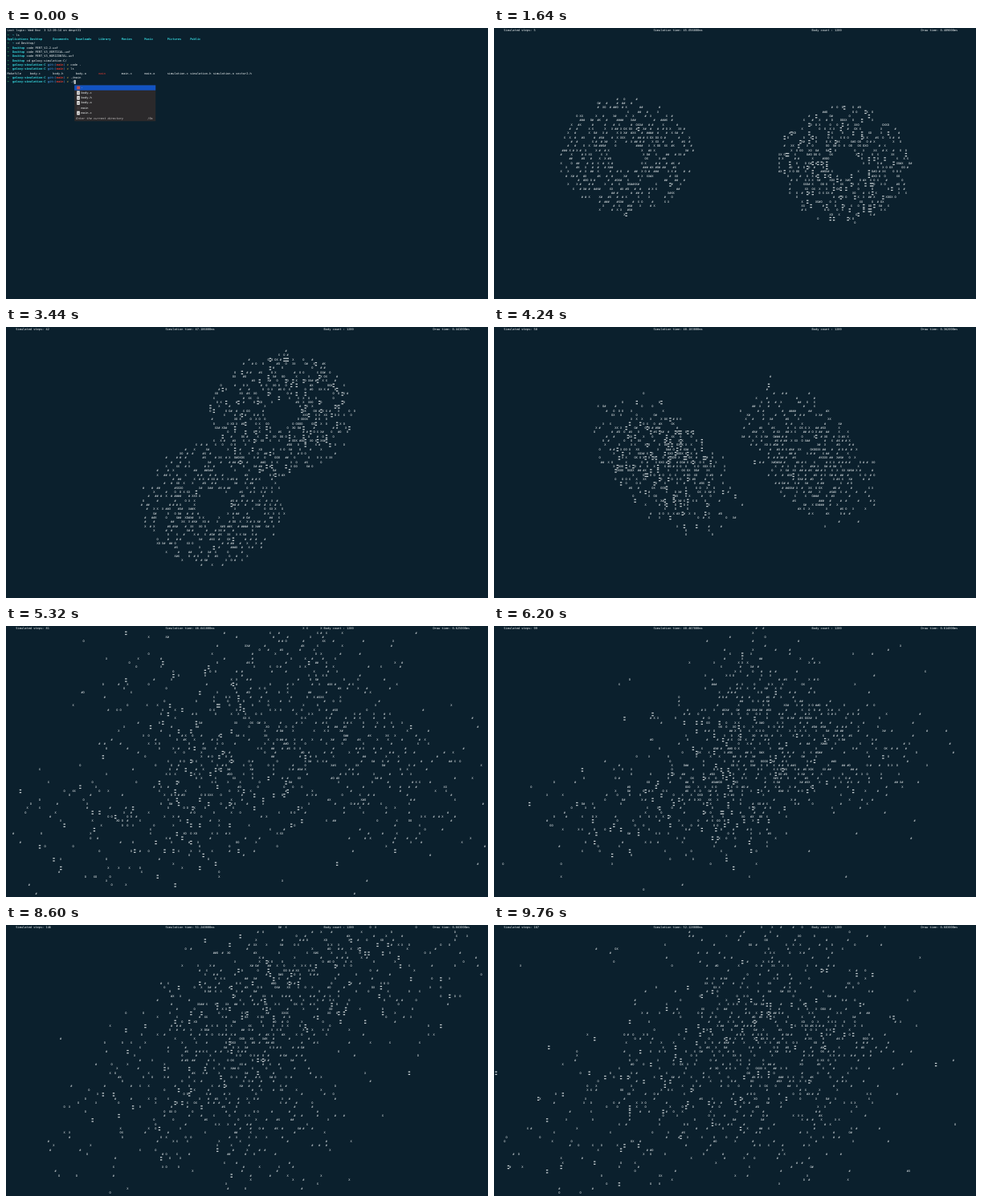
An HTML page with a canvas for the animation above (9.8 s loop, 600 by 338 pixels).

```html
<!DOCTYPE html>
<html lang="en">
<head>
<meta charset="utf-8">
<title>Galaxy simulation in a terminal</title>
<style>
html, body { margin: 0; width: 100%; height: 100%; overflow: hidden; background: #0b202d; }
canvas { display: block; }
</style>
</head>
<body>
<canvas id="stage" width="600" height="338"></canvas>
<script>
const ctx = document.getElementById('stage').getContext('2d');
const LOOP = 9.8, CLEAR = 1.32, START = 1.4;
const CELL_W = 2.19, CELL_H = 5.33, LEFT = 1.4, TOP = 3.5;
const BG = '#0b202d', INK = '#f0f5f6', CYAN = '#35d5dc', RED = '#d8392f', BLUE = '#3f83c4', GREEN = '#3fc46b';
const FONT = '3.64px "DejaVu Sans Mono", "Liberation Mono", monospace';

const colX = col => LEFT + col * CELL_W;
const rowY = row => TOP + row * CELL_H;

function label(str, x, y, color = INK, style = '') {
  ctx.font = style + ' ' + FONT;
  ctx.fillStyle = color;
  ctx.fillText(str, x, y);
}
const put = (col, row, str, color, style) => label(str, colX(col), rowY(row), color, style);

function box(x, y, w, h, color) {
  ctx.fillStyle = color;
  ctx.fillRect(x, y, w, h);
}

// ---- Shell session ----
const REPO = 'galaxy-simulation-C';
const history = [
  ['~', 'ls'], null, ['~', 'cd Desktop/'],
  ['Desktop', 'code PERT_V2.2.uxf'], ['Desktop', 'code PERT_V3_VERTICAL.uxf'],
  ['Desktop', 'code PERT_V3_HORIZONTAL.uxf'], ['Desktop', 'cd ' + REPO + '/'],
  [REPO, 'code .'], [REPO, 'ls'], null, [REPO, './main']
];
const folders = 'Applications Desktop Documents Downloads Library Movies Music Pictures Public'.split(' ');
const files = 'Makefile body.c body.h body.o main main.c main.o simulation.c simulation.h simulation.o vector2.h'.split(' ');
const choices = ['.', 'body.c', 'body.h', 'body.o', 'main', 'main.c'];

function prompt(row, dir, command) {
  put(0, row, '➜', GREEN, 'bold');
  put(3, row, dir, CYAN, 'bold');
  let col = 4 + dir.length;
  if (dir === REPO) {
    put(col, row, 'git:(', BLUE, 'bold');
    put(col + 5, row, 'main', RED, 'bold');
    put(col + 9, row, ')', BLUE, 'bold');
    put(col + 11, row, '✗', '#d9b648', 'bold');
    col += 13;
  }
  put(col, row, command);
  return col + command.length;
}

function popup(x, y, typed) {
  const items = choices.filter(name => name.startsWith(typed));
  const pitch = 6.3, height = items.length * pitch + 7;
  box(x, y, 101, height, '#2b292b');
  box(x, y, 101, pitch, '#1253c2');
  items.forEach((name, i) => {
    const mid = y + (i + .5) * pitch;
    if (name === '.') box(x + 3, mid - 2, 4, 4, '#c0504a');
    else if (name === 'main') box(x + 3, mid - 2, 4, 4, '#3a3537');
    else {
      box(x + 3, mid - 2.4, 3.6, 4.8, '#e8e8e8');
      box(x + 4, mid - .4, 1.6, 1.2, '#777');
    }
    label(name, x + 8.4, mid);
  });
  const foot = y + height - 3.6;
  label(typed ? 'file' : 'Enter the current directory', x + 2, foot, '#c9c5c5', 'italic');
  label('/0x', x + 91, foot, '#c9c5c5');
}

function drawShell(t) {
  put(0, 0, 'Last login: Wed Nov  3 12:19:14 on devpt31');
  history.forEach((line, i) => line && prompt(i + 1, ...line));
  folders.forEach((name, i) => put(i * 13, 2, name, CYAN, 'bold'));
  files.forEach((name, i) => put(i * 13, 10, name, name === 'main' ? RED : INK));
  const typed = 'main'.slice(0, Math.max(0, Math.floor((t - .12) / .14)));
  const entered = t > 1.12;
  const end = prompt(12, REPO, './' + typed);
  const x = entered ? LEFT : colX(end);
  box(x, rowY(entered ? 13 : 12) - 2.6, CELL_W, 5, '#c4cbce');
  if (!entered) popup(x + .6, 71.4, typed);
}

// ---- Simulation ----
// time, step, sim ms, draw ms, spread, then three points on each galaxy's spine;
// one point means a plain disc, a missing second galaxy mirrors the first
const keys = [
  [1.4, 0, 44.9, .48, 80, 165, 158],
  [2, 12, 45.3, .5, 92, 163, 166],
  [2.68, 26, 45.858, .506, 114, 176, 193],
  [3.45, 42, 47.2, .44, 90, 258, 222],
  [4.24, 58, 48.183, .362, 62, 350, 115, 390, 160, 430, 203],
  [5.32, 81, 46.64, .625, 92, 370, 5, 390, 130, 530, 215, 50, 265, 290, 205, 150, 60],
  [7.12, 117, 50.645, .572, 70, 280, 100, 330, 160, 390, 115, 185, 208, 315, 200, 370, 195],
  [8.6, 146, 51.239, .663, 92, 370, 15, 295, 150, 350, 275, 135, 280, 310, 95, 555, 60],
  [9.76, 167, 52.128, .683, 112, 300, 40, 380, 160, 320, 250, 100, 270, 270, 170, 420, 75]
].map(k => {
  const head = k.slice(0, 5);
  let spine = k.slice(5);
  if (spine.length === 2) spine = [...spine, ...spine, ...spine];
  if (spine.length === 6) spine = spine.concat(spine.map((v, i) => (i % 2 ? 330 : 600) - v));
  return [...head, ...spine];
});

// Cubic Hermite through the keys
function sample(t) {
  let i = 0;
  while (i < keys.length - 2 && t >= keys[i + 1][0]) i++;
  const a = keys[i], b = keys[i + 1], span = b[0] - a[0];
  const f = Math.min(1, (t - a[0]) / span), g = 1 - f;
  const slope = (k, j) => {
    const p = keys[Math.max(0, k - 1)], n = keys[Math.min(keys.length - 1, k + 1)];
    return (n[j] - p[j]) / (n[0] - p[0]) * span;
  };
  return a.map((v, j) => v * g * g * (1 + 2 * f) + b[j] * f * f * (3 - 2 * f)
    + slope(i, j) * f * g * g - slope(i + 1, j) * f * f * g);
}

let seed = 7;
const random = () => (seed = seed * 16807 % 2147483647) / 2147483647;

const bodies = Array.from({ length: 1060 }, (_, i) => ({
  galaxy: i % 2,
  along: random(),
  radius: .24 + .76 * random() ** .85,
  angle: random() * Math.PI * 2,
  stray: random() < .22 ? random() * 1.6 : 0,
  depth: random(),
  phase: random() * 6
}));

function glyphFor(body, t) {
  const depth = body.depth + .08 * Math.sin(t * 2 + body.phase);
  const [hash, cross, ring] = body.galaxy ? [.2, .5, .82] : [.55, .88, 1.04];
  return depth < hash ? '#' : depth < cross ? 'X' : depth < ring ? 'O' : '=';
}

function drawBodies(t, state) {
  const used = new Set();
  const spread = state[4], loose = Math.min(1, Math.max(0, (t - 4.3) / .9));
  for (const body of bodies) {
    const u = body.along, o = 5 + body.galaxy * 6;
    const w0 = (1 - u) * (1 - 2 * u), w1 = 4 * u * (1 - u), w2 = u * (2 * u - 1);
    const spine = j => w0 * state[o + j] + w1 * state[o + 2 + j] + w2 * state[o + 4 + j];
    const r = spread * body.radius * (1 + body.stray * loose);
    const angle = body.angle - t * 1.2 / (.5 + body.radius);
    const col = Math.round((spine(0) + r * Math.cos(angle) - LEFT) / CELL_W);
    const row = Math.round((spine(1) + r * .86 * Math.sin(angle) - TOP) / CELL_H);
    const cell = row * 300 + col;
    if (row < 0 || row > 62 || col < 0 || col > 272 || used.has(cell)) continue;
    used.add(cell);
    const glyph = glyphFor(body, t);
    if (glyph === '=') {
      box(colX(col), rowY(row) - 2.2, 2.4, 1.3, '#c8d0d3');
      box(colX(col), rowY(row) + 1, 2.4, 1.3, '#c8d0d3');
    } else put(col, row, glyph);
  }
}

function drawSimulation(t) {
  const state = sample(t);
  drawBodies(t, state);
  const header = (col, str) => {
    box(colX(col), 0, str.length * CELL_W, 6, BG);
    put(col, 0, str);
  };
  header(5, 'Simulated steps: ' + Math.floor(state[1] + .3));
  header(90, 'Simulation time: ' + state[2].toFixed(3) + '000ms');
  header(180, 'Body count : 1200');
  header(242, 'Draw time: ' + state[3].toFixed(3) + '000ms');
}

ctx.textBaseline = 'middle';
function frame() {
  const t = performance.now() / 1000 % LOOP;
  box(0, 0, 600, 338, BG);
  if (t < CLEAR) drawShell(t);
  else if (t >= START) drawSimulation(t);
  requestAnimationFrame(frame);
}
frame();
</script>
</body>
</html>
```
